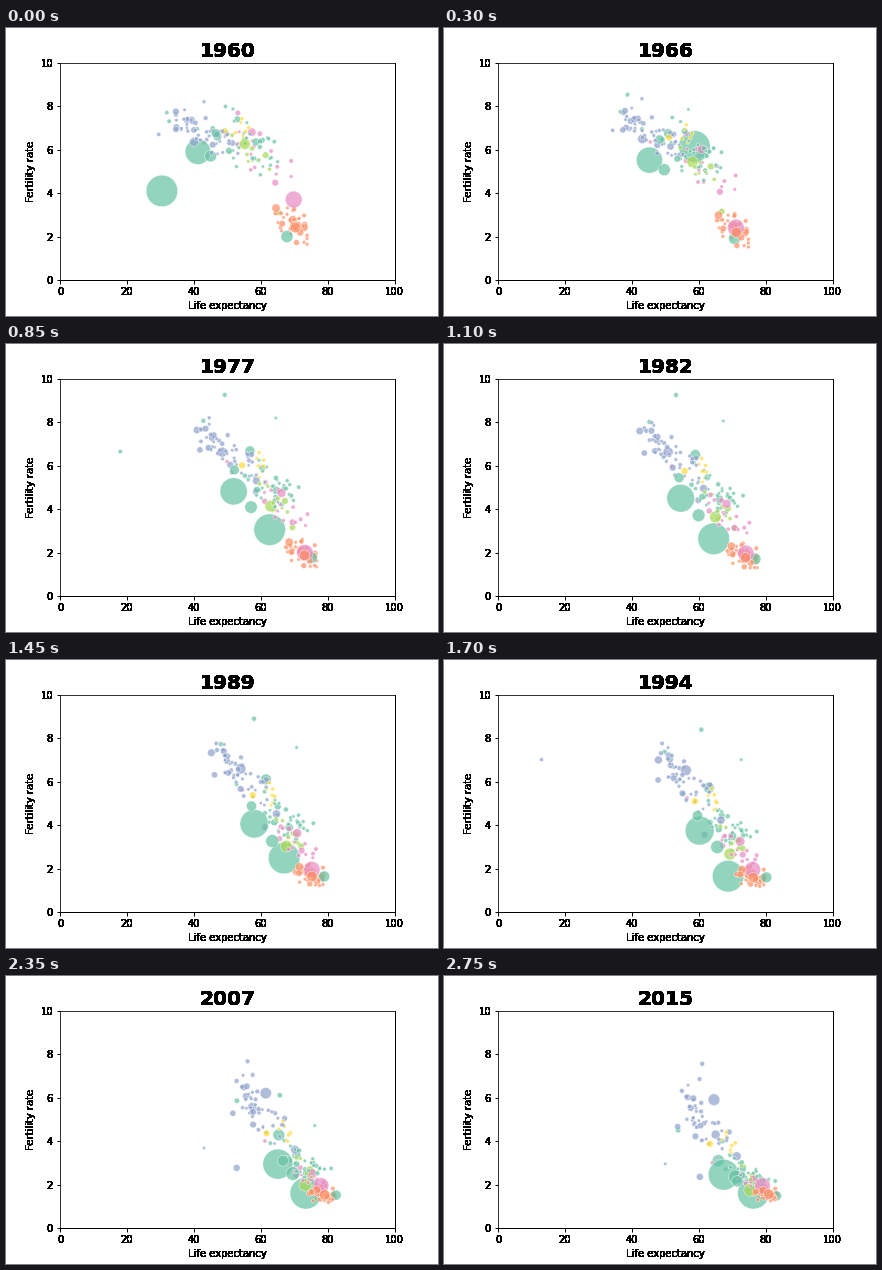
A matplotlib script for the animation above (2.8 s loop, 432x288 px).

```python
import numpy as np
import matplotlib.pyplot as plt
from matplotlib.animation import FuncAnimation

plt.rcParams["font.family"] = "DejaVu Sans"
plt.rcParams["font.size"] = 10

START, COUNT = 1960, 56
T = np.arange(COUNT)
U = T / (COUNT - 1)
ASIA, EUROPE, AFRICA = "#66c2a5", "#fc8d62", "#8da0cb"
NORTH, SOUTH, OCEANIA = "#e78ac3", "#a6d854", "#ffd92f"

rng = np.random.default_rng(12)
bubbles = []


def curve(a, mid, b):
    """Parabola through the first, middle and last value."""
    return a * (1 - U) * (1 - 2 * U) + 4 * mid * U * (1 - U) + b * U * (2 * U - 1)


def pulse(center, width):
    return np.exp(-(((T - center) / width) ** 2))


def fall(center, width):
    """Smooth step from one down to zero."""
    return 1 / (1 + np.exp((T - center) / width))


def add(color, life, births, share, order=None):
    """Store one country; share is its population relative to the largest."""
    size = 10 + 990 * (share[0] + (share[-1] - share[0]) * U)
    key = rng.random() if order is None else order
    bubbles.append((key, color, life, births, size))


def country(color, share, *points, order=None, dip=None):
    """Path through three (life, births) points; dip = (year, low, width)."""
    life, births = (curve(*values) for values in zip(*points))
    if dip:
        year, low, width = dip
        life = life + (low - life) * pulse(year - START, width)
    add(color, life, births, share, order)


def small(n):
    return np.minimum(np.exp(rng.normal(-5.2, 1.1, n)), 0.035)


def crowd(color, shares, *points, life_sd, births_sd, link=0.6):
    """Countries scattered around the mean path of their continent."""
    life, births = (curve(*values) for values in zip(*points))
    sd_l, sd_b = (a + (b - a) * U for a, b in (life_sd, births_sd))
    for share in shares:
        first, drift = np.clip(rng.normal(size=(2, 2)), -1.9, 1.9)
        a, b = (p + (0.6 * q - 0.35 * p) * U for p, q in zip(first, drift))
        x = np.minimum(life + sd_l * a, 73.8 + 9 * U)
        y = births + sd_b * (np.sqrt(1 - link ** 2) * b - link * a)
        add(color, x, np.maximum(y, 1.15), [share])


# Asia: the largest country starts in a famine, then births fall in two steps
famine = pulse(0.5, 1.2)
add(ASIA, 56.5 + 19.8 * U - 31 * famine,
    1.6 + fall(31, 1) + 3.6 * fall(13.5, 1.8) - 2.5 * famine, [1], order=0.2)
country(ASIA, (0.65, 0.95), (41.2, 5.9), (57.3, 4.15), (67.4, 2.45), order=0.42)
country(ASIA, (0.13, 0.19), (45, 5.7), (62.7, 3.35), (71, 2.35), order=0.43)
country(ASIA, (0.07, 0.14), (47, 6.6), (61, 6.2), (65.8, 3.1))
country(ASIA, (0.07, 0.12), (46.5, 6.75), (56.5, 5), (71.5, 2.15))
country(ASIA, (0.14, 0.09), (67.8, 2), (78.5, 1.65), (83.2, 1.48))
country(ASIA, (0.05, 0.07), (58.5, 6.35), (68, 4), (76, 1.95))
country(ASIA, (0.01, 0.02), (31.9, 7.7), (57, 9), (67, 4))
country(ASIA, (0.01, 0.02), (32.6, 7.3), (47.5, 7.8), (53.8, 4.5))
country(ASIA, (0.001, 0.003), (52, 7.3), (70, 7.7), (77, 2.7))
country(ASIA, (0.01, 0.01), (41, 6.95), (52, 6), (68, 2.7), dip=(1977, 18, 1.9))
crowd(ASIA, small(34), (57, 6.2), (67.5, 4.3), (75.3, 2.4),
      life_sd=(6, 4), births_sd=(0.9, 0.5))

# Africa
country(AFRICA, (0.07, 0.13), (40, 6.35), (53.3, 6.6), (64.5, 5.9))
country(AFRICA, (0.03, 0.07), (40, 6.9), (44.5, 7.4), (65, 4.3))
country(AFRICA, (0.04, 0.07), (47, 6.65), (64, 4.6), (71.3, 3.3))
country(AFRICA, (0.03, 0.04), (51.5, 6.3), (61, 4), (61.2, 2.35),
        dip=(2006, 52.5, 6))
country(AFRICA, (0.001, 0.001), (47, 5.8), (61, 5), (54, 2.95),
        dip=(2007, 43, 8))
country(AFRICA, (0.005, 0.008), (43, 8.2), (48, 7.6), (66, 3.9),
        dip=(1994, 13, 0.9))
country(AFRICA, (0.005, 0.014), (37, 7.4), (46, 7.75), (61, 7.55))
country(AFRICA, (0.008, 0.012), (29.5, 6.7), (48.5, 7.2), (60.2, 6.85))
crowd(AFRICA, small(42), (44.5, 6.65), (54.5, 6.2), (61.5, 4.7),
      life_sd=(5.2, 4.2), births_sd=(0.5, 0.85))

# Europe: five large countries, then the rest
for shares in ([0.1, 0.07, 0.06, 0.06, 0.04], small(33)):
    crowd(EUROPE, shares, (69.3, 2.6), (73.7, 1.78), (79.3, 1.62),
          life_sd=(2.6, 2.8), births_sd=(0.45, 0.2), link=0.4)

# The Americas
add(NORTH, curve(69.8, 75, 79), 1.95 + 1.75 * np.exp(-T / 4.5),
    [0.28, 0.235], order=0.95)
country(NORTH, (0.06, 0.09), (57.3, 6.8), (70.3, 3.75), (76.3, 2.2))
country(NORTH, (0.006, 0.008), (43, 6.3), (54, 5.7), (64, 3),
        dip=(2010, 32.2, 0.4))
crowd(NORTH, small(17), (60.5, 5.8), (70.3, 3.25), (75.5, 2.1),
      life_sd=(4.5, 2.6), births_sd=(0.9, 0.3))
country(SOUTH, (0.11, 0.15), (55.2, 6.25), (67, 3.15), (75.3, 1.75))
country(SOUTH, (0.03, 0.03), (65.3, 3.1), (71.7, 3.05), (76.7, 2.3))
crowd(SOUTH, small(9), (58, 5.8), (68.5, 3.6), (75.5, 2.3),
      life_sd=(4, 2), births_sd=(0.7, 0.3))

# Oceania
crowd(OCEANIA, small(8), (56, 6.4), (63.5, 5.1), (69, 3.6),
      life_sd=(5, 4), births_sd=(0.6, 0.4))

bubbles.sort(key=lambda b: b[0])
colors = [b[1] for b in bubbles]
life, births, sizes = (np.array([b[i] for b in bubbles]) for i in (2, 3, 4))

fig = plt.figure(figsize=(6, 4), dpi=72, facecolor="white")
ax = fig.add_axes([0.125, 0.125, 0.775, 0.755])
ax.set(xlim=(0, 100), ylim=(0, 10),
       xticks=range(0, 101, 20), yticks=range(0, 11, 2))
ax.tick_params(width=1)
for side in ("bottom", "right"):
    ax.spines[side].set_linewidth(1)
title = ax.set_title(str(START), fontsize=20, fontweight="bold")
x_label = ax.set_xlabel("Life expectancy")
y_label = ax.set_ylabel("Fertility rate")


def harden(text, passes=24):
    """Paint a text over itself until its soft edges turn solid."""
    paint = text.draw

    def draw_text(renderer):
        for _ in range(passes):
            paint(renderer)

    text.draw = draw_text


for text in (title, x_label, y_label, *ax.get_xticklabels(), *ax.get_yticklabels()):
    harden(text)

dots = ax.scatter(life[:, 0], births[:, 0], s=sizes[:, 0], c=colors,
                  alpha=0.7, edgecolors="white", linewidths=0.6)


def draw(i):
    dots.set_offsets(np.column_stack([life[:, i], births[:, i]]))
    dots.set_sizes(sizes[:, i])
    title.set_text(str(START + i))
    return [dots, title]


anim = FuncAnimation(fig, draw, frames=COUNT, interval=50,
                     repeat=True, repeat_delay=0)
plt.show()
```
